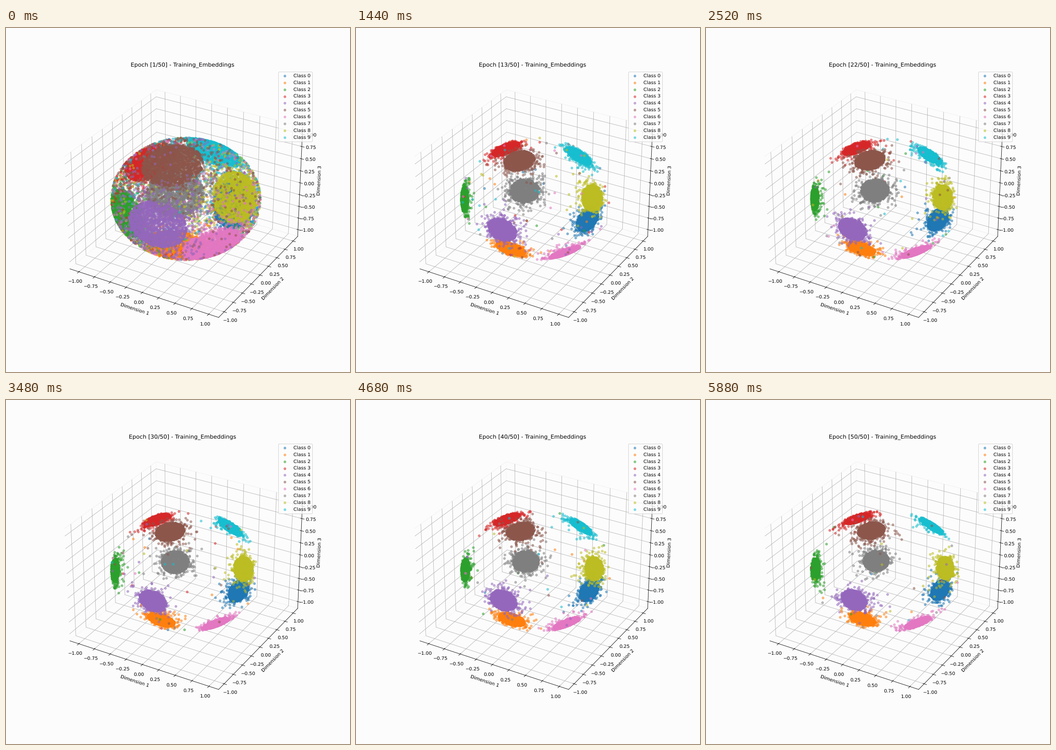
Recreate the animation shown at these times as a matplotlib script. Size 748 by 748 pixels, loop 6 s.

```python
import numpy as np
import matplotlib.pyplot as plt
from matplotlib.animation import FuncAnimation

EPOCHS = 50
PAPER = "#fcfcfc"
MARGIN = 0.5 * (1.1 * 25 / 24 - 1)  # axis padding per unit of data range

# Where each class settles, as pixels right and up from the sphere's middle
CENTRES = np.array([116 - 46j, -54 - 110j, -156, -64 + 111j, -73 - 68j,
                    -35 + 85j, 66 - 118j, -23 + 18j, 127 + 3j, 98 + 95j])
NEAR = {4, 5, 6, 8}  # classes on the viewer's side
SIDE = np.array([1 if k in NEAR else -1 for k in range(10)])

plt.rcParams["text.hinting"] = "none"


def lerp(a, b, t):
    return a + (b - a) * t


def unit(v):
    return v / np.linalg.norm(v, axis=1, keepdims=True)


def lift(offset):
    """Turn screen offsets into unit vectors on the sphere."""
    scale = 1.0
    for _ in range(4):
        a, b = offset.real / 161.75 * scale, offset.imag / 132.6 * scale
        r = np.maximum(np.hypot(a, b) / 0.985, 1)
        a, b = a / r, b / r
        g = SIDE * np.sqrt(1 - a**2 - b**2)
        scale = 1 - 0.0475 * g + 0.012 * b  # undo the perspective
    c, z = -0.61 * b + 0.7924 * g, 0.7924 * b + 0.61 * g
    return np.column_stack((0.866 * a + 0.5 * c, 0.5 * a - 0.866 * c, z))


def progress(frame):
    """Fast initial collapse and slow later drift."""
    return np.exp(-frame / 2.5), max(frame - 12, 0) / (EPOCHS - 13)


def embeddings(frame):
    rng = np.random.default_rng(100 + frame)
    early, late = progress(frame)
    # far classes start swirled, all start pulled inwards
    start = CENTRES * 0.92 * np.exp(0.25j * (SIDE < 0))
    drift = (4 + 4.5j) * (late - 0.5)
    centres = lift(lerp(CENTRES + drift, start, early))

    core = int(lerp(900, 1700, early))
    halo = int(lerp(lerp(300, 200, late), 500, early))
    radius = lerp(lerp(0.205, 0.18, late), 0.42, early)
    sigma = lerp(0.135, 0.34, early)
    stray = lerp(lerp(0.007, 0.002, late), 0.06, early)
    for centre in centres:
        angle = np.concatenate((radius * np.sqrt(rng.random(core)),
                                rng.rayleigh(sigma, halo)))[:, None]
        tangent = unit(np.cross(centre, rng.normal(size=(core + halo, 3))))
        pts = centre * np.cos(angle) + tangent * np.sin(angle)
        lost = rng.random(len(pts)) < stray
        pts[lost] = rng.normal(size=(lost.sum(), 3))
        # a few samples land in another class
        pts[:2] = centres[rng.integers(0, 10, 2)] + rng.normal(0, 0.1, (2, 3))
        yield unit(pts)


fig = plt.figure(figsize=(10, 10), dpi=74.8, facecolor=PAPER)
ax = fig.add_subplot(projection="3d", computed_zorder=False, facecolor=PAPER)
ax.set(xlabel="Dimension 1", ylabel="Dimension 2", zlabel="Dimension 3")
for axis in (ax.xaxis, ax.yaxis, ax.zaxis):
    axis.pane.set(facecolor=PAPER, edgecolor="#f2f2f2", alpha=1)
clouds = []


def padded(lo, hi):
    pad = MARGIN * (hi - lo)
    return lo - pad, hi + pad


def update(frame):
    while clouds:
        clouds.pop().remove()
    shrink = progress(frame)[1] ** 2
    ax.set_xlim(*padded(-1 + 0.0065 * shrink, 1 - 0.016 * shrink))
    ax.set_ylim(*padded(-1, 1))
    ax.set_zlim(*padded(-1, 1))
    for k, pts in enumerate(embeddings(frame)):
        clouds.append(ax.scatter(*pts.T, color=f"C{k}", alpha=0.5, label=f"Class {k}",
                                 zorder=2 + SIDE[k] * (1 - 0.05 * k)))
    ax.set_title(f"Epoch [{frame + 1}/{EPOCHS}] - Training_Embeddings")
    return clouds


update(0)
ax.legend(loc="upper right", facecolor=PAPER)

anim = FuncAnimation(fig, update, frames=EPOCHS, interval=120, repeat=True,
                     repeat_delay=0, init_func=lambda: clouds, blit=False)
plt.show()
```
